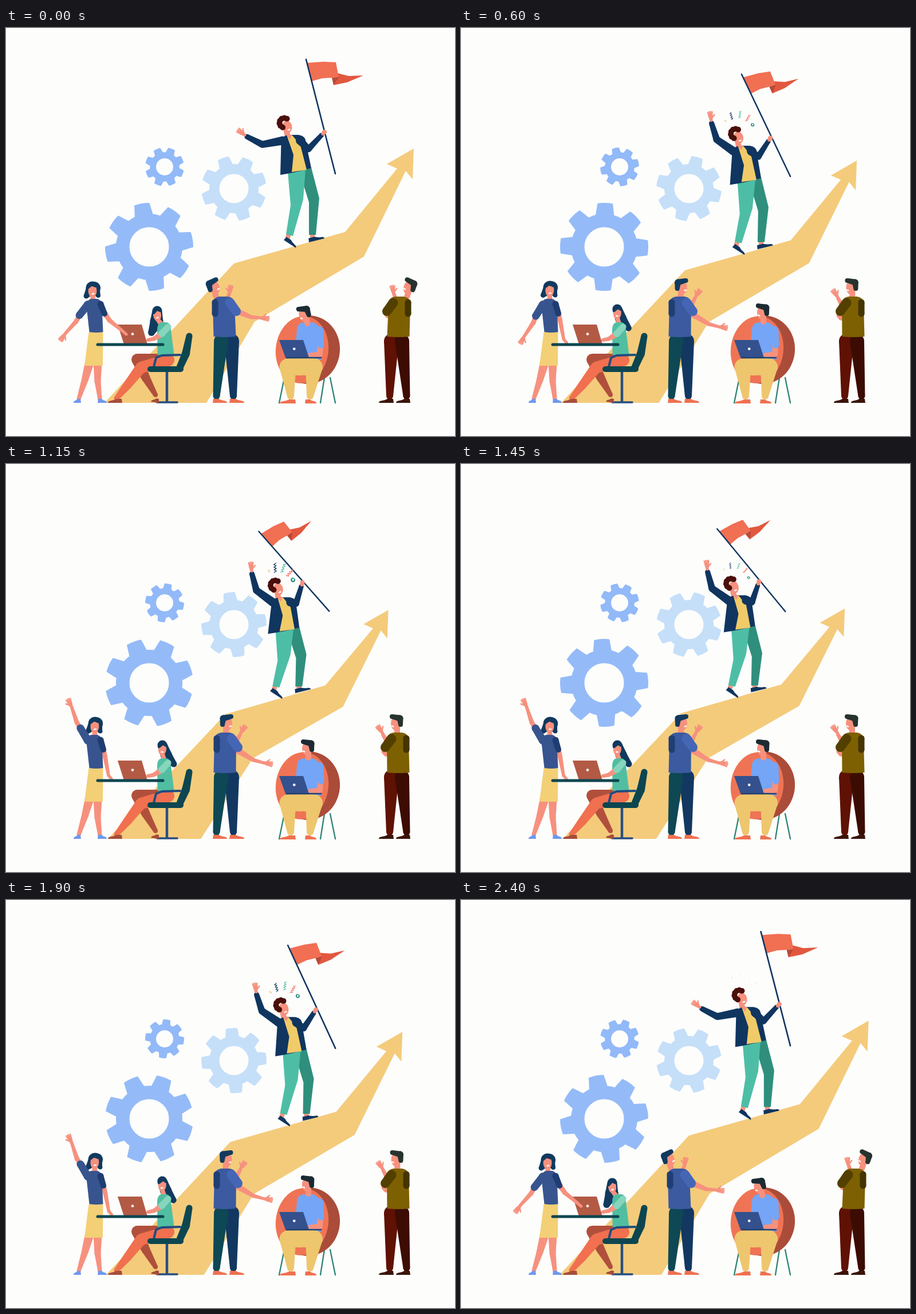
Write an HTML page with a canvas that moves like this. It is 784x714 px and loops after 2450 ms.

```html
<!DOCTYPE html>
<html lang="en">
<head>
<meta charset="utf-8">
<title>Team growth</title>
<style>
html, body { margin: 0; width: 100%; height: 100%; overflow: hidden; background: #fdfdfc; }
canvas { display: block; width: 784px; height: 714px; }
</style>
</head>
<body>
<canvas id="stage" width="784" height="714"></canvas>
<script>
const c = document.getElementById('stage').getContext('2d');
const LOOP = 2450, STEP = 50, TAU = Math.PI * 2;
const SKIN = '#f6917e', NAVY = '#10355f', TEAL = '#0d4650', CORAL = '#f0704f', HAIR = '#113a5e';
const still = (x, y) => [x, y];
let warp = still;

const clamp = v => Math.max(0, Math.min(1, v));
const ease = v => (v = clamp(v), v * v * (3 - 2 * v));
const lerp = (a, b, k) => a + (b - a) * k;
const mix = (a, b, k) => a.map((v, i) => lerp(v, b[i], k));
const rad = d => d * Math.PI / 180;
// Steps from a point; angle 0 points left, 90 points up.
const step = ([x, y], deg, d) => [x - d * Math.cos(rad(deg)), y - d * Math.sin(rad(deg))];

function trace(flat) {
  c.beginPath();
  for (let i = 0; i < flat.length; i += 2) c.lineTo(...warp(flat[i], flat[i + 1]));
}

function fill(color) {
  c.fillStyle = color;
  c.fill();
}

function poly(color, ...flat) {
  trace(flat);
  fill(color);
}

function line(color, width, ...flat) {
  trace(flat);
  c.strokeStyle = color;
  c.lineWidth = width;
  c.lineCap = c.lineJoin = 'round';
  c.stroke();
}

function oval(color, x, y, rx, ry = rx, rot = 0) {
  c.beginPath();
  c.ellipse(...warp(x, y), rx, ry, rot, 0, TAU);
  fill(color);
}

// Tapered limb; joints are x, y, width triples.
function limb(color, ...flat) {
  let last;
  for (let i = 0; i < flat.length; i += 3) {
    const [x, y] = warp(flat[i], flat[i + 1]), r = flat[i + 2] / 2;
    c.beginPath();
    c.arc(x, y, r, 0, TAU);
    fill(color);
    if (last) {
      const a = Math.atan2(y - last.y, x - last.x) + Math.PI / 2, u = Math.cos(a), v = Math.sin(a);
      c.beginPath();
      c.moveTo(last.x + u * last.r, last.y + v * last.r);
      c.lineTo(x + u * r, y + v * r);
      c.lineTo(x - u * r, y - v * r);
      c.lineTo(last.x - u * last.r, last.y - v * last.r);
      fill(color);
    }
    last = { x, y, r };
  }
}

// Trapezoid between two level edges given by centre and width.
function block(color, x1, y1, w1, x2, y2, w2) {
  poly(color, x1 - w1 / 2, y1, x1 + w1 / 2, y1, x2 + w2 / 2, y2, x2 - w2 / 2, y2);
}

// Garment with round shoulders; tilt raises the right end of the hem.
function shirt(color, x, y, w, hemX, hemY, hemW, tilt = 0) {
  const curve = (a, b) => c.quadraticCurveTo(...warp(...a), ...warp(...b));
  const l = x - w / 2, r = x + w / 2;
  c.beginPath();
  c.moveTo(...warp(l, y + 13));
  curve([l, y + 2], [x - w / 5, y]);
  c.lineTo(...warp(x + w / 5, y));
  curve([r, y + 2], [r, y + 13]);
  c.lineTo(...warp(hemX + hemW / 2, hemY - tilt));
  curve([hemX, hemY + 2], [hemX - hemW / 2, hemY + tilt]);
  c.closePath();
  fill(color);
}

function place(x, y, deg, sx, sy, draw) {
  c.save();
  c.translate(x, y);
  c.rotate(rad(deg));
  c.scale(sx, sy);
  draw();
  c.restore();
}

// Shoe from the heel; a negative length points left.
function shoe(color, x, y, length, deg = 0) {
  const [px, py] = warp(x, y), L = Math.abs(length);
  place(px, py, deg, Math.sign(length), 1, () => {
    c.beginPath();
    c.moveTo(0, 0);
    c.lineTo(1, -7);
    c.lineTo(.42 * L, -7);
    c.quadraticCurveTo(.6 * L, -4, .85 * L, -3.5);
    c.quadraticCurveTo(L, -3, L, 0);
    fill(color);
  });
}

function hand([x, y], deg, flip) {
  place(x, y, deg, 1, flip, () => {
    limb(SKIN, -6, 0, 5, 1, 0, 7.5);
    for (let i = 0; i < 4; i++) {
      const a = -.42 + i * .28;
      line(SKIN, 2.3, 1, -2.6 + i * 1.7, 9.5 * Math.cos(a), 9.5 * Math.sin(a));
    }
    line(SKIN, 2.4, -2, 2, 3, 7);
  });
}

function laptop(color, x, y, dx, h) {
  block(color, x - dx, y - h, 42, x, y, 41);
  oval('#ffffff', x - dx / 2, y - h / 2, 2.3);
}

function gear(x, y, size, hole, deg, color) {
  const body = size * .75;
  c.beginPath();
  for (let i = 0; i < 8; i++) {
    const a = rad(deg - 90 + i * 45);
    c.arc(x, y, body, a - .393, a - .27);
    c.arc(x, y, size, a - .165, a + .165);
    c.arc(x, y, body, a + .27, a + .393);
  }
  c.closePath();
  c.moveTo(x + hole, y);
  c.arc(x, y, hole, 0, TAU);
  c.fillStyle = c.strokeStyle = color;
  c.lineWidth = 2;
  c.lineJoin = 'round';
  c.fill('evenodd');
  c.stroke();
}

function gears(t) {
  const x = t / LOOP, turn = 90 * x - 8.5 * Math.sin(TAU * x - .4);
  gear(250, 383, 76, 35.5, turn - 13, '#94bbf8');
  gear(398, 281, 56, 26.5, -16 - turn, '#c5dff9');
  gear(277, 243, 33, 16, turn + 18, '#92b9f8');
}

function arrow(p) {
  const [tx, ty] = mix([712, 211], [667, 256], p), k = 1 - .08 * p;
  const head = [-29, 35, -47, 27, 0, 0, -2, 54, -14, 39].map((v, i) => (i % 2 ? ty : tx) + v * k);
  const left = mix([172, 656, 398, 412, 592, 357], [178, 656, 383, 438, 557, 388], p);
  const right = mix([625, 400, 434, 514, 350, 656], [588, 425, 431, 515, 340, 656], p);
  poly('#f4cb7b', ...left, ...head, ...right);
}

function flag(q) {
  const [x, y] = mix([524, 55], [440, 119], q), k = 1 - .1 * q;
  place(x, y, -27.5 * q, k, k, () => {
    poly('#e2583f', 55, 24, 74, 29, 100, 28, 72, 40, 48, 45);
    poly('#b84a38', 45, 32, 58, 30, 48, 45);
    poly('#f16f53', 2, 6, 30, 4, 52, 5, 57, 31, 45, 32, 28, 33, 10, 38);
    line(NAVY, 2.6, 0, 0, 51, 200);
  });
}

// Three bursts per loop, fanned out above the head.
function confetti(t, q) {
  const u = t * 3 / LOOP % 1, k = Math.min(clamp((u - .1) / .25), clamp((.97 - u) / .3));
  const colors = ['#ecc25e', NAVY, '#56bfa5', '#ef6f62', '#2f9380'];
  const [x, y] = mix([489, 172], [472, 218], q);
  if (!k) return;
  colors.forEach((color, i) => {
    const a = rad(224 + 22.5 * i + 20 * q), r = (36 + 5 * Math.sin(i * Math.PI / 4)) * (1 - .1 * q);
    const curl = i % 4 === 0, pts = [];
    for (let j = 0; j < (curl ? 5 + 3 * i : 8); j++) {
      if (curl) pts.push((2 + j * .12) * Math.cos(j * .7), (2 + j * .12) * Math.sin(j * .7));
      else pts.push(-8 + j * 2.3, j % 2 ? 2 : -2);
    }
    place(x + r * Math.cos(a), y + r * Math.sin(a), a * 180 / Math.PI, k, k, () => line(color, 1.3, ...pts));
  });
}

function leader(p, q, s) {
  flag(q);
  // The body sinks and shortens as the arrow descends.
  warp = (x, y) => {
    const d = Math.max(0, (y - 186) / 70), m = Math.min(1, d), u = (d - m) / 1.5;
    const k = lerp(q, p, clamp(d / 2.7));
    return [x - k * (16 + 6 * m + 2 * u), y + k * (47 - 6 * m - 13 * u)];
  };
  limb(SKIN, 535, 355, 8, 535, 368, 8);
  limb(SKIN, 495, 355, 8, 492, 367, 8);
  poly('#2f8f7c', 512, 250, 533, 244, 547, 298, 541, 362, 529, 362, 529, 305);
  poly('#4dbea5', 492, 252, 523, 247, 519, 300, 501, 364, 489, 361, 497, 310);
  shoe(NAVY, 485, 371, 25, 33);
  shoe(NAVY, 529, 375, 28, -14);

  const shoulder = warp(483, 197), lift = s * (1 + s) / 2;
  const elbow = step(shoulder, -11 + 47 * lift, 36), bend = 27 + 48 * s * s * s;
  const wrist = step(elbow, bend, 30);
  const grip = mix([556, 182], [517, 208], q), fold = mix([528, 212], [506, 245], q);
  const cuff = mix(fold, grip, .82), joint = warp(513, 197);

  limb(SKIN, 489, 178, 9, 492, 190, 10);
  shirt(NAVY, 502, 187, 43, 506, 251, 54, 6);
  poly('#f0cb68', 490, 187, 500, 188, 514, 205, 525, 248, 499, 252, 502, 222);
  poly(SKIN, 488, 185, 499, 187, 496, 195);
  oval(SKIN, 491, 173, 8.5, 11, -.15);
  for (let i = 0; i < 7; i++) {
    const a = rad(110 + 32 * i);
    oval('#4a0f0b', 486 + 8.5 * Math.cos(a), 166 + 8.5 * Math.sin(a), 5);
  }
  oval('#ffffff', 494, 178, 2.8, 1.3, -.35);
  warp = still;
  limb(NAVY, ...joint, 14, ...fold, 11, ...cuff, 8);
  limb(SKIN, ...mix(fold, grip, .9), 6, ...grip, 8);
  limb(NAVY, ...shoulder, 15, ...elbow, 12, ...wrist, 9);
  hand(step(wrist, bend + 9, 11), bend + 189, 1);
}

function presenter(t, s) {
  limb(SKIN, 146, 585, 16, 138, 615, 12, 127, 649, 7);
  limb(SKIN, 160, 586, 15, 160, 618, 11, 164, 650, 7);
  shoe('#6d98ef', 131, 656, -13);
  shoe('#6d98ef', 160, 656, 16);
  block('#f3cf76', 157, 532, 25, 153, 591, 32);
  place(151 + 4 * s, 458 - s, 3 * s, 1, 1, () => {
    limb(HAIR, 0, -3, 23, -11, 11, 9);
    limb(HAIR, 3, -3, 22, 10, 10, 8);
    limb(SKIN, 0, 6, 8, 1, 18, 9);
    oval(SKIN, 0, 2, 7.5, 11.5);
    limb(HAIR, -8, -4, 5, -2, -10, 7, 6, -7, 6);
    oval('#ffffff', 1, 7, 2.8, 1.3, -.2);
  });
  // The free arm hangs, swings up past the side, waves and drops again.
  const swing = ease((t - 650) / 470) - ease((t - 1980) / 430);
  const angle = lerp(36, 28, s) + 128 * swing - 90;
  const shoulder = [139, 486 - 6 * swing];
  const along = (d, bend) => step(shoulder, angle + bend, d);
  limb(SKIN, ...along(10, 0), 9, ...along(32, -5), 8, ...along(60, 0), 5.5);
  hand(along(66, 0), angle + 180, -1);
  limb('#38548e', 143, 484, 14, ...along(20, -3), 13);
  const [wx, wy, hx, hy] = mix([202, 529, 210, 536], [179, 545, 184, 551], s);
  limb(SKIN, 168, 493, 10, lerp(181, 173, s), 512, 8, wx, wy, 5.5, hx, hy, 5);
  shirt('#38548e', 154, 474, 27, 157.5, 532, 24);
  limb('#1f3d71', 165, 483, 11, lerp(172, 170, s), 500, 10);
}

function worker(s) {
  line('#294e80', 4.5, 281, 600, 281, 654);
  line('#294e80', 3.5, 264, 655, 299, 655);
  limb(HAIR, ...mix([264, 495, 17, 263, 514, 23, 254, 533, 12], [273, 492, 17, 280, 510, 20, 293, 525, 11], s));
  limb('#b0503c', 278, 580, 20, 229, 580, 20, 244, 612, 15, 261, 642, 8);
  shoe('#a64c3a', 267, 656, -14, 8);
  limb(CORAL, 283, 581, 22, 236, 594, 20, 212, 625, 15, 193, 648, 9);
  shoe('#a64c3a', 203, 656, -25);
  const [x, y] = mix([264, 502], [273, 499], s);
  limb(SKIN, x, y + 7, 7, lerp(271, 276, s), 518, 9);
  shirt('#51bea1', 276, 515, 24, 279, 572, 29);
  place(x, y, -5 + 10 * s, 1, 1, () => {
    oval(SKIN, 0, 0, 7, 11);
    limb(HAIR, -6, -4, 5, 0, -11, 7, 6, -7, 5);
    oval('#ffffff', 0, 5, 2.6, 1.3, -.1);
  });
  limb(SKIN, 268, 538, 10, 258, 544, 7, 248, 546, 6);
  limb('#87d5bd', 283, 523, 11, 272, 535, 12);
  limb(TEAL, 320, 539, 11, 314, 570, 14, 303, 595, 12);
  line('#1f4c80', 4, 258, 593, 262, 577, 272, 573, 304, 572);
  line(TEAL, 10, 252, 597, 305, 597);
}

// Head in profile, facing right unless flipped.
function profile(x, y, deg, flip, hair) {
  place(x, y, deg, flip, 1, () => {
    limb(SKIN, -2, 6, 10, -2, 18, 10);
    oval(SKIN, 1, 2, 8, 12);
    limb(hair, -8, 4, 8, -7, -7, 11, 7, -10, 8);
    oval('#ffffff', 6, 7, 2.6, 1.3, -.3);
  });
}

function stander(s, look) {
  limb(look.farLeg, 394, 548, 26, 397, 644, 12);
  limb(look.nearLeg, 375.5, 548, 25, 367.5, 644, 12);
  shoe(look.shoe, 361, 656, 25);
  shoe(look.shoe, 390, 656, 26);
  profile(lerp(363, 386, s), 452, -18 * (1 - s), 1, look.hair);
  const lean = 3 * s;
  const [ax, ay, hx, hy] = mix([386, 478, 391, 460], [400, 489, 413, 466], s);
  limb(SKIN, ax, ay, 9, lerp(ax, hx, .7), lerp(ay, hy, .7), 6);
  hand([hx, hy], -80 + 25 * s, -1);
  if (look.reach) {
    const [ex, ey, wx, wy] = mix([428, 506, 444, 507], [432, 518, 450, 523], s);
    limb(SKIN, 404, 496 + 5 * s, 11, ex, ey, 7, wx, wy, 5);
    hand([wx + 6, wy + 1], 5 + 5 * s, -1);
  } else {
    limb(SKIN, 403 + 4 * s, 499 + 4 * s, 9, 400 + 3 * s, 503 + 4 * s, 10);
  }
  shirt(look.shirt, 380 + lean, 470, 38, 382, 540, 39);
  limb(look.back, 365 + lean, 480, 11, 365 + lean, 500, 11);
  limb(look.sleeve, 391 + lean, 481, 17, 402 + lean, 496, 16);
}

function lounger(s) {
  for (const [top, foot] of [[486, 477], [556, 549], [566, 575]]) line('#2c8474', 2.3, top, 612, foot, 656);
  oval('#aa4c39', 528, 563, 55, 60, .12);
  oval('#ef7455', 517, 563, 46, 59, .12);
  shirt('#75a5f7', 527, 515, 38, 527, 580, 48);
  profile(lerp(520, 526, s), lerp(500, 496, s), -14 + 14 * s, -1, '#1c2b33');
  limb('#eec66d', 522, 593, 30, 538, 593, 30, 531, 644, 12);
  limb('#eec66d', 515, 593, 30, 492, 593, 29, 497, 644, 12);
  shoe(CORAL, 506, 657, -28);
  shoe(CORAL, 522, 657, 20);
  limb(SKIN, 549, 557, 10, 548, 571, 10, 531, 572, 7);
  limb('#75a5f7', 546, 530, 17, 550, 555, 11);
  laptop('#34518d', 508.5, 577, 10.5, 31);
  line('#20406f', 2.4, 490, 577, 550, 577);
}

const greeter = {
  farLeg: '#123861', nearLeg: '#0e4854', shoe: CORAL, hair: HAIR,
  shirt: '#3b5a9f', back: '#1f3f74', sleeve: '#4566b5', reach: true
};
const admirer = {
  farLeg: '#5f1103', nearLeg: '#3c0c03', shoe: '#3b1408', hair: '#26332f',
  shirt: '#7d6002', back: '#443500', sleeve: '#534000', reach: false
};

function draw(t) {
  const p = (1 - Math.cos(TAU * (t - 15) / LOOP)) / 2;
  const q = p * (.76 + .24 * p);
  const s = ease(t / 650) * (1 - ease((t - 1850) / 580));
  c.fillStyle = '#fdfdfc';
  c.fillRect(0, 0, 784, 714);
  gears(t);
  arrow(p);
  leader(p, q, s);
  confetti(t, q);
  worker(s);
  laptop('#b35a45', 226, 552, 10, 33);
  presenter(t, s);
  line(TEAL, 5, 160, 554, 274, 554);
  stander(s, greeter);
  lounger(s);
  place(1067, 0, 0, -1, 1, () => stander(s, admirer));
}

function frame() {
  draw(Math.floor(performance.now() % LOOP / STEP) * STEP);
  requestAnimationFrame(frame);
}
frame();
</script>
</body>
</html>
```
